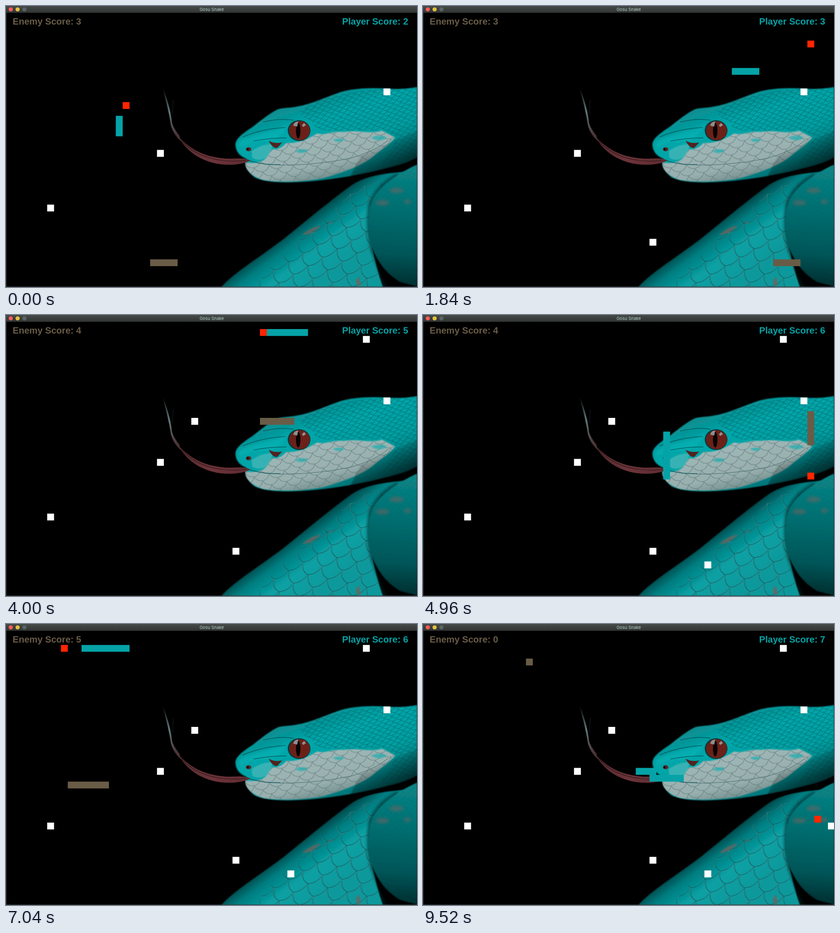
Write an HTML page that moves like this. It is 903x620 px and loops after 9600 ms.

```html
<!DOCTYPE html>
<html lang="en">
<head>
<meta charset="utf-8">
<title>Gosu Snake</title>
<style>
html, body { margin: 0; width: 100%; height: 100%; overflow: hidden; background: #000; }
svg { display: block; width: 903px; height: 620px; }
.score { font: bold 20.1px "Liberation Sans", Arial, sans-serif; font-kerning: none; }
</style>
</head>
<body>
<svg viewBox="0 0 903 620" xmlns="http://www.w3.org/2000/svg">
<defs>
  <linearGradient id="bar" x2="0" y2="1"><stop stop-color="#464b49"/><stop offset="1" stop-color="#303432"/></linearGradient>
  <linearGradient id="skin" gradientUnits="userSpaceOnUse" x1="690" y1="200" x2="760" y2="385">
    <stop stop-color="#078f92"/><stop offset=".25" stop-color="#06a6a9"/><stop offset=".6" stop-color="#059fa2"/><stop offset="1" stop-color="#056d70"/>
  </linearGradient>
  <linearGradient id="jaw" gradientUnits="userSpaceOnUse" x1="660" y1="285" x2="685" y2="392">
    <stop stop-color="#a0b7b7"/><stop offset=".65" stop-color="#98afae"/><stop offset="1" stop-color="#6d8988"/>
  </linearGradient>
  <linearGradient id="coil" gradientUnits="userSpaceOnUse" x1="622" y1="496" x2="700" y2="600">
    <stop stop-color="#034648"/><stop offset=".22" stop-color="#067d80"/><stop offset=".55" stop-color="#07a1a4"/><stop offset="1" stop-color="#07999c"/>
  </linearGradient>
  <linearGradient id="bend" gradientUnits="userSpaceOnUse" x1="880" y1="358" x2="860" y2="612">
    <stop stop-color="#078587"/><stop offset=".4" stop-color="#066d6f"/><stop offset=".75" stop-color="#045557"/><stop offset="1" stop-color="#022f31"/>
  </linearGradient>
  <linearGradient id="tip" gradientUnits="userSpaceOnUse" x1="346" y1="180" x2="372" y2="285">
    <stop stop-color="#405655" stop-opacity="0"/><stop offset=".5" stop-color="#61797a"/><stop offset="1" stop-color="#4b3436"/>
  </linearGradient>
  <linearGradient id="tongue" gradientUnits="userSpaceOnUse" x1="380" y1="290" x2="535" y2="345">
    <stop stop-color="#522b2e"/><stop offset=".5" stop-color="#6c343a"/><stop offset="1" stop-color="#5e2b30"/>
  </linearGradient>
  <linearGradient id="under" gradientUnits="userSpaceOnUse" x1="800" y1="310" x2="830" y2="370">
    <stop stop-opacity="0"/><stop offset="1" stop-opacity=".55"/>
  </linearGradient>
  <pattern id="fine" width="17" height="12" patternUnits="userSpaceOnUse" patternTransform="rotate(-14)">
    <path d="M0 0Q2 6 8.5 6Q15 6 17 0M-8.500 6Q-6.500 12 0 12Q6.500 12 8.500 6Q10.500 12 17 12" fill="none" stroke="#02565a" stroke-width="1.200"/>
  </pattern>
  <pattern id="plates" width="34" height="25" patternUnits="userSpaceOnUse" patternTransform="rotate(-12)">
    <path d="M0 0Q4 12 17 12.500Q30 12 34 0M0 25Q13 24 17 12.500Q21 24 34 25" fill="none" stroke="#607b7c" stroke-width="1.200"/>
  </pattern>
  <pattern id="broad" width="44" height="50" patternUnits="userSpaceOnUse" patternTransform="translate(705 480) rotate(12) skewX(-12)">
    <path d="M0 0Q6 20 22 25Q38 20 44 0M0 50Q18 45 22 25Q26 45 44 50" fill="none" stroke="#045357" stroke-width="2"/>
    <path d="M0 1Q6 21 22 26Q38 21 44 1M0 51Q18 46 22 26Q26 46 44 51" fill="none" stroke="#5ea3a2" stroke-width=".8"/>
  </pattern>
  <filter id="soft" x="-30%" y="-30%" width="160%" height="160%"><feGaussianBlur stdDeviation="3"/></filter>
  <filter id="edge"><feGaussianBlur stdDeviation="1.200"/></filter>
  <clipPath id="view"><rect y="15" width="903" height="604"/></clipPath>
  <path id="head" d="M903 179C880 183 860 184 835 182C800 180 765 181 735 190C700 202 667 218 638 222C618 226 608 224 597 228C572 241 555 257 540 268C519 282 504 293 504 306C505 321 513 331 528 337C523 350 530 364 546 378C564 387 595 390 630 389C700 387 780 373 835 358C865 351 888 343 903 334Z"/>
  <path id="lip" d="M526 345C540 348 556 346 566 340C574 334 576 326 584 316C596 318 606 313 616 302C638 304 660 296 684 281C700 287 716 275 742 278C770 272 800 284 826 275L855 290C842 307 826 315 808 331C785 351 745 366 700 379C660 388 600 390 566 384C540 376 524 361 526 345Z"/>
  <path id="trunk" d="M473 620C500 589 555 556 610 514C662 472 710 431 757 397C780 380 815 370 875 366L830 415C805 452 808 506 812 550C817 580 827 600 840 620Z"/>
  <path id="curl" d="M903 350C865 367 828 392 808 423C792 455 795 500 804 530C817 570 840 593 866 609L903 619Z"/>
</defs>

<rect width="903" height="620"/>
<g clip-path="url(#view)">
  <use href="#trunk" fill="url(#coil)" filter="url(#edge)"/>
  <path d="M545 620C590 565 665 495 772 402L860 372L815 415C794 452 799 506 804 550L825 620Z" fill="url(#broad)" opacity=".8"/>
  <path d="M650 506Q668 488 692 484Q680 498 662 504ZM706 481l9-7l2 4ZM768 606l8-9l4 20h-9Z" fill="#73605b" opacity=".75" filter="url(#edge)"/>
  <path d="M862 372Q812 398 800 440Q792 500 810 550Q822 585 842 620" fill="none" stroke="#011a1b" stroke-width="7" opacity=".7" filter="url(#soft)"/>
  <path d="M804 530Q822 575 866 609L880 620H828Q814 580 804 530Z" opacity=".9" filter="url(#edge)"/>
  <use href="#curl" fill="url(#bend)" filter="url(#edge)"/>
  <use href="#curl" fill="url(#fine)" opacity=".15"/>
  <g fill="#6d6460" opacity=".6" filter="url(#soft)">
    <ellipse cx="827" cy="434" rx="15" ry="6"/><ellipse cx="858" cy="407" rx="16" ry="6"/><ellipse cx="882" cy="432" rx="8" ry="5"/>
  </g>

  <use href="#head" fill="url(#skin)" filter="url(#edge)"/>
  <path d="M903 181C840 182 770 181 690 208C650 226 625 235 672 253C680 285 720 274 830 274L860 290L825 350L903 332Z" fill="url(#fine)" opacity=".55"/>
  <use href="#lip" fill="url(#jaw)" filter="url(#edge)"/>
  <use href="#lip" fill="url(#plates)" opacity=".8"/>
  <path d="M540 320Q562 304 586 305Q584 318 573 334Q556 344 541 335Z" fill="#4fb9ba" opacity=".7" filter="url(#edge)"/>
  <path d="M635 320q15-7 29-2q-14 12-29 2M718 295q14-5 26 0q-13 10-26 0M802 290q18-8 35 0q-16 13-35 0" fill="#18adb0" opacity=".65" filter="url(#edge)"/>
  <path d="M512 299Q547 282 601 272L619 258Q608 295 573 298Q544 298 512 313Z" fill="#10bcbe" opacity=".45" filter="url(#soft)"/>
  <path d="M520 289Q562 271 614 268M544 298Q579 291 616 291M565 256Q602 247 632 252M511 326Q520 335 540 343Q570 351 603 350" fill="none" stroke="#034e52" stroke-width="1.600" opacity=".8"/>
  <path d="M600 351Q680 352 760 335Q813 319 840 296" fill="none" stroke="#4d6e6e" stroke-width="1.600" opacity=".7"/>
  <path d="M780 330L903 275V338Q845 361 755 379Z" fill="url(#under)" filter="url(#edge)"/>
  <path d="M577 297Q590 305 607 301L596 313Q586 315 577 297Z" fill="#502421"/>
  <ellipse cx="533" cy="316" rx="6" ry="4.500" fill="#552c2c"/><circle cx="531" cy="316" r="2.500" fill="#160c0c"/>
  <ellipse cx="644" cy="275" rx="25" ry="23" fill="#053d40"/>
  <ellipse cx="645" cy="275" rx="23" ry="21" fill="#6b2119"/>
  <ellipse cx="642" cy="275" rx="5" ry="17" fill="#080404"/>
  <path d="M631 264q2-9 11-9l-2 11ZM650 263l5-5l4 5l-6 4Z" fill="#9aabac" opacity=".8"/>

  <path d="M344 180C351 205 358 228 363 263C367 278 376 290 383 296L380 286C371 275 366 266 364 258C361 228 352 202 344 180Z" fill="url(#tip)" stroke="url(#tip)" stroke-width="1.500"/>
  <path d="M368 207Q365 225 366 240" fill="none" stroke="#263938" stroke-width="2" opacity=".4" filter="url(#edge)"/>
  <path d="M379 289C404 314 432 332 476 336C501 339 520 332 537 341C520 350 495 352 470 349C428 343 397 321 379 289Z" fill="url(#tongue)"/>
  <path d="M386 298Q420 335 478 341Q507 344 527 340" fill="none" stroke="#35191c" stroke-width="1.200"/>
</g>

<path d="M0 619.500H903M.5 15V620" stroke="#3b3e3d" fill="none"/>
<rect width="903" height="15" fill="url(#bar)"/>
<circle cx="10.500" cy="7.500" r="4.600" fill="#fc5b57"/>
<circle cx="25.500" cy="7.500" r="4.600" fill="#e5bf3c"/>
<circle cx="40.500" cy="7.500" r="4.600" fill="#596562"/>
<text x="452" y="11" text-anchor="middle" fill="#b9d3d0" style="font:9.500px Inter,sans-serif">Gosu Snake</text>

<path id="blocks" fill="#fff"/>
<path id="enemy" fill="#695c47"/>
<path id="player" fill="#05a3a7"/>
<path id="food" fill="#ff2600"/>
<text id="enemyScore" class="score" x="14.500" y="41" fill="#695c47"></text>
<text id="playerScore" class="score" x="738.500" y="41" fill="#05a3a7"></text>
</svg>

<script>
const LOOP = 9600, STEP = 80, CELL = 15.08, TOP = 16;
const $ = id => document.getElementById(id);

// Corner points are expanded into one cell per game tick.
function route(text) {
  const pts = text.split(" ").map(p => p.split(",").map(Number));
  const cells = [pts[0]];
  let [x, y] = pts[0];
  for (const [nx, ny] of pts.slice(1)) {
    while (x !== nx || y !== ny) {
      x += Math.sign(nx - x);
      y += Math.sign(ny - y);
      cells.push([x, y]);
    }
  }
  return cells;
}

const playerRoute = route("16,17 16,13 42,13 42,8 56,8 56,4 52,4 52,9 56,9 56,0 56,1 35,1 35,26 17,26 17,2 6,2 6,18 37,18 37,21 33,21 33,20 31,20");
const enemyRoute = route("24,36 18,36 56,36 56,26 51,26 51,14 56,14 37,14 37,13 56,13 56,22 8,22 8,20 17,20 17,36 22,36 22,20");
const rebornRoute = route("2,4 30,4");
const blocks = [[55, 11], [22, 20], [6, 28], [33, 33], [52, 2], [27, 14], [41, 35], [59, 28]];

const playerEats = [3, 51, 73, 93, 171];
const enemyEats = [68, 121, 196];
const CRASH = 217;
const foods = [
  [0, 17, 13], [3, 56, 4], [51, 51, 14], [68, 56, 0], [73, 37, 1],
  [93, 56, 22], [121, 8, 2], [171, 17, 36], [196, 22, 8], [CRASH, 57, 27]
];

const count = (list, tick) => list.filter(t => t <= tick).length;

// The game starts slowly, then runs two ticks per step.
const tickAt = n => n <= 6 ? n : 2 * n - 6 - (n > 17) - (n > 36);

function squares(cells) {
  return cells.map(([c, r]) =>
    `M${(c * CELL).toFixed(2)} ${(TOP + r * CELL).toFixed(2)}h${CELL}v${CELL}h${-CELL}z`).join("");
}

function body(cells, head, length) {
  return squares(cells.slice(Math.max(0, head - length + 1), head + 1));
}

let last = -1;
function draw(time) {
  const step = Math.floor(time % LOOP / STEP);
  if (step === last) return;
  last = step;
  const tick = tickAt(step);
  const score = 2 + count(playerEats, tick);
  const reborn = tick >= CRASH;
  const rival = reborn ? 0 : 3 + count(enemyEats, tick);

  $("player").setAttribute("d", body(playerRoute, tick + 2, score + 1));
  $("enemy").setAttribute("d", reborn
    ? body(rebornRoute, tick - CRASH, 1)
    : body(enemyRoute, tick + 3, rival + 1));
  $("blocks").setAttribute("d", squares(blocks.slice(0, score + 1)));
  const food = foods.filter(f => f[0] <= tick).pop();
  $("food").setAttribute("d", squares([food.slice(1)]));
  $("playerScore").textContent = "Player Score: " + score;
  $("enemyScore").textContent = "Enemy Score: " + rival;
}

const start = performance.now();
function loop(now) {
  draw(Math.max(0, now - start));
  requestAnimationFrame(loop);
}
draw(0);
requestAnimationFrame(loop);
</script>
</body>
</html>
```
